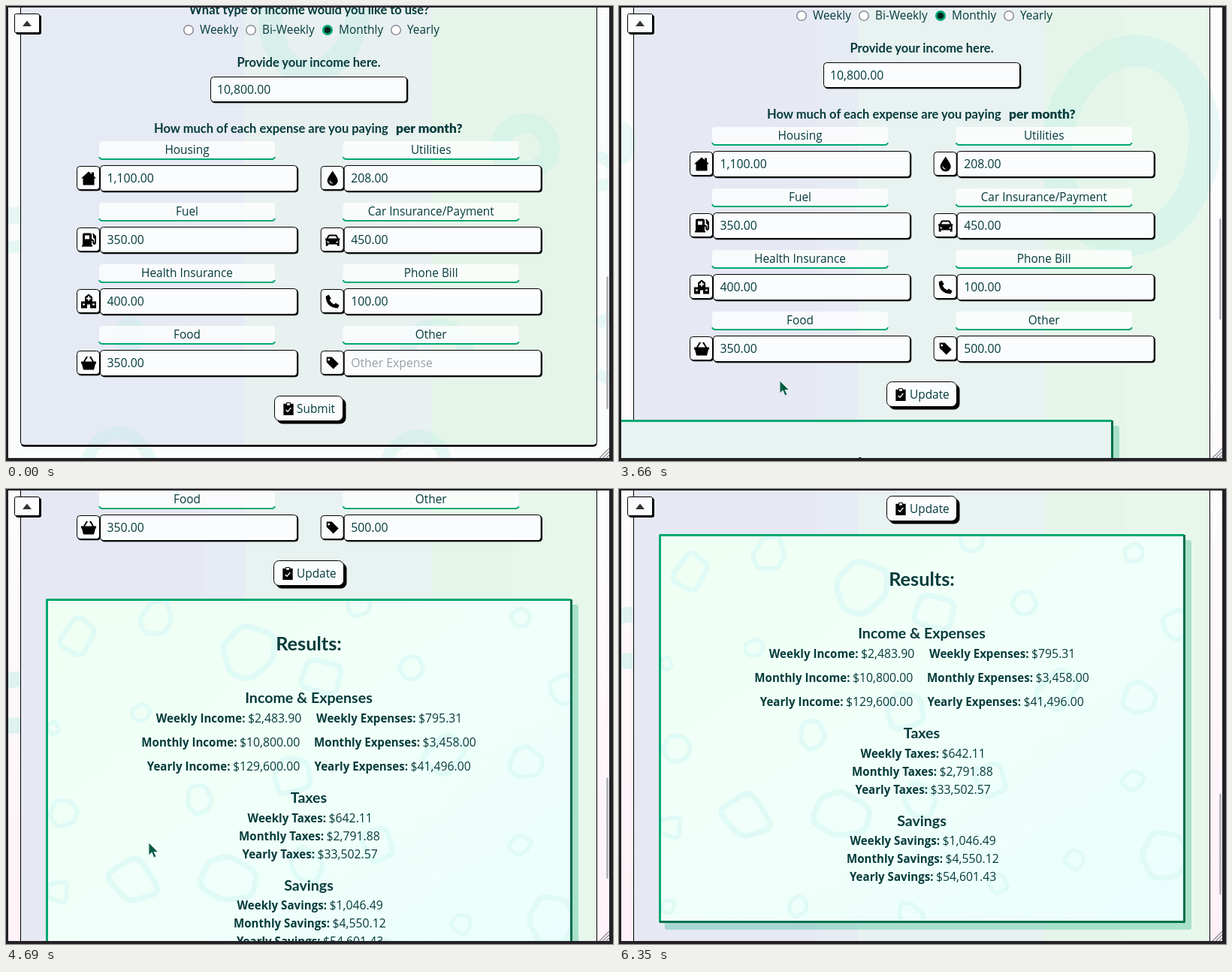
An HTML page that plays this animation: 808x606 px, repeating every 6500 ms.

```html
<!DOCTYPE html>
<html lang="en">
<head>
<meta charset="utf-8">
<title>Budget form</title>
<style>
  html, body { margin: 0; width: 100%; height: 100%; overflow: hidden; background: #232126; }
  svg { display: block; width: 808px; height: 606px; }
  text { font: 15.4px "Open Sans", "Noto Sans", sans-serif; fill: #053b3b; white-space: pre; }
  .num { font-size: 15.8px; }
  .mid { text-anchor: middle; }
  .end { text-anchor: end; font-weight: 700; font-size: 15.1px; }
  .head { font: 700 16.5px Lato, sans-serif; }
  .strong { font: 900 17.4px Lato, sans-serif; }
  .sub { font: 700 19.6px Lato, sans-serif; }
  .title { font: 700 25.3px Lato, sans-serif; }
  .hint { fill: #9aa0a8; }
  .item { font: 10.8px Roboto, sans-serif; fill: #fbfbfe; }
  .foot { fill: #cbdad6; }
</style>
</head>
<body>
<svg viewBox="0 0 808 606">
  <defs>
    <linearGradient id="mint" x2="1" y2="1">
      <stop stop-color="#f0fff3"/><stop offset=".5" stop-color="#f0fff9"/><stop offset="1" stop-color="#eafefe"/>
    </linearGradient>
    <linearGradient id="blush" gradientUnits="userSpaceOnUse" x1="0" y1="450" x2="0" y2="1100">
      <stop stop-color="#fdfdfd"/><stop offset="1" stop-color="#fff0f7"/>
    </linearGradient>
    <clipPath id="sheet"><rect x="55" y="572" width="696" height="514"/></clipPath>
  </defs>
  <g id="page">
    <g id="before"></g>
    <g id="after"></g>
    <g id="form"></g>
    <g id="lastRow"></g>
    <g id="button"></g>
    <g id="results"></g>
  </g>
  <g id="chrome"></g>
  <rect id="thumb" x="799" width="3" rx="1.5" fill="#b9b9bf"/>
  <path d="M0 0H808V606H0ZM3 2V602H803V2Z" fill="#232126" fill-rule="evenodd"/>
  <g id="cursor"></g>
</svg>
<script>
const LOOP = 6500, SUBMIT = 2950, GREEN = '#00a873';
const $ = id => document.getElementById(id);
const clamp = u => Math.max(0, Math.min(1, u));
const smooth = u => u * u * (3 - 2 * u);
const mix = (a, b, u) => a + (b - a) * u;

// Keys are [time, ...values]; values between keys are eased.
function track(keys, t) {
  const i = keys.findIndex(k => k[0] > t);
  if (i === 0) return keys[0].slice(1);
  if (i < 0) return keys[keys.length - 1].slice(1);
  const a = keys[i - 1], b = keys[i], u = smooth((t - a[0]) / (b[0] - a[0]));
  return a.slice(1).map((v, k) => mix(v, b[k + 1], u));
}

const text = (x, y, s, cls = '') => `<text x="${x}" y="${y}" class="${cls}">${s}</text>`;
const rect = (x, y, w, h, fill, more = '') =>
  `<rect x="${x}" y="${y}" width="${w}" height="${h}" fill="${fill}" ${more}/>`;
const box = (x, y, w, h, drop, r = 4) =>
  rect(x + drop, y + drop, w, h, '#000', `rx="${r}" stroke="#000"`) +
  rect(x, y, w, h, '#fafcfe', `rx="${r}" stroke="#000"`);
const ring = (x, y, rx, ry, width, turn = 0) =>
  `<ellipse cx="${x}" cy="${y}" rx="${rx}" ry="${ry}" transform="rotate(${turn} ${x} ${y})"
    fill="none" stroke="#b9ece2" stroke-width="${width}" opacity=".33"/>`;

// Vertical colour bands given as [left edge, colour], ending at `end`.
const bands = (list, end, y, h) => list.map(([x, c], i) =>
  rect(x, y, (list[i + 1] || [end])[0] - x, h, c)).join('');
const panelEdge = bottom =>
  `<path d="M19.5-900V${bottom - 5}q0 5 5 5H781.5q5 0 5-5V-900" fill="none" stroke="#000"/>
   <path d="M21 ${bottom - 1}q1 2 4 2H781q4 0 5-3" fill="none" stroke="#000" stroke-width="2"/>`;

$('before').innerHTML =
  rect(0, 0, 808, 606, '#fbfdfc') +
  bands([[20, '#e6eaf4'], [317, '#e8f0f0'], [567, '#e6f5ea']], 786, 0, 585) +
  ring(411, 5, 58, 84, 32, 10) + ring(691, 188, 33, 32, 26) +
  ring(165, 438, 11, 15, 19, 10) + ring(573, 455, 38, 27, 23) +
  ring(150, 640, 48, 72, 17, 0) + ring(545, 618, 40, 46, 17, 20) +
  `<g fill="none" stroke="#b9ece2" opacity=".33"><path d="M0 280L20 278" stroke-width="22"/>
   <path d="M0 322L20 320M787 200Q800 203 808 212M787 240L808 236M787 425Q800 412 808 418M787 490L808 500" stroke-width="16"/></g>` +
  panelEdge(585);

$('after').innerHTML =
  rect(0, 0, 808, 1400, 'url(#blush)') +
  ring(212, 1140, 30, 24, 17) + ring(685, 1128, 34, 24, 17) +
  bands([[20, '#e6e9f4'], [264, '#e7ebf3'], [318, '#e8f2f1'], [567, '#e6f5ea'], [675, '#e8f7ec']], 786, 0, 1138) +
  ring(681, 205, 98, 127, 42, 8) + ring(0, 201, 10, 16, 26) +
  `<path d="M0 679L19 677M0 739L19 739" stroke="#b9ece2" stroke-width="21" opacity=".45"/>` +
  panelEdge(1138) +
  bands([[0, '#30575c'], [50, '#32595b'], [470, '#33594f']], 808, 1155, 200) +
  rect(0, 1154, 808, 2, '#000') + text(403, 1238, '© OltaByx, 2023', 'mid foot');

const icons = {
  house: 'M-10 0L0-9L4-5.5V-8H7V-3L10 0H7.5V9H-7.5V0Z',
  drop: 'M0-10C4-4 7 0 7 3.5A7 6.5 0 0 1-7 3.5C-7 0-4-4 0-10ZM-4 3Q-4 7 0 7V6Q-3 6-3 3Z',
  pump: 'M-9 9V7H-8V-7Q-8-9-6-9H2Q4-9 4-7V-1Q8-1 7 4Q8 5 8-1L6-3V-7L5-8L6-9L10-5V4Q8 9 5 4Q6 1 4 1V7H5V9ZM-5-6V-1H1V-6Z',
  car: 'M-9 8V1L-10-2H-8L-6-6Q-5-7-4-7H4Q5-7 6-6L8-2H10L9 1V8H6V6H-6V8ZM-6-2H6L4-5H-4ZM-7 1V4H-4ZM7 1V4H4Z',
  clinic: 'M-10 9V0H-5V-6L0-10L5-6V0H10V9H2V4H-2V9ZM-1-7V-5H-3V-3H-1V-1H1V-3H3V-5H1V-7ZM-8 3V5H-5V3ZM5 3V5H8V3Z',
  phone: 'M-9-7L-5-9L-2-4L-4-2Q-2 2 2 4L4 2L9 5L7 9Q-9 8-9-7Z',
  basket: 'M-10-2H-7L-3-9L-1-8L-5-2H5L1-8L3-9L7-2H10V1H9L7 9H-7L-9 1H-10Z',
  tag: 'M-8-8H-1L8 1L1 8L-8-1ZM-5-6A1.5 1.5 0 1 0-4.9-6Z',
  board: 'M-7-7H-3V-9H3V-7H7V9H-7ZM-2-8V-5H2V-8ZM-4 2L-1 5L4-1L3-2L-1 3L-3 1Z'
};
const icon = (name, x, y, k = 1) =>
  `<path d="${icons[name]}" transform="translate(${x} ${y}) scale(${k})" fill-rule="evenodd"/>`;

const label = (mid, y, w, s) =>
  rect(mid - w / 2, y, w, 24, '#fff', 'rx="4" fill-opacity=".78"') +
  `<path d="M${mid - w / 2} ${y + 21}q1 3 4 3H${mid + w / 2 - 4}q3 0 4-3" fill="none" stroke="${GREEN}" stroke-width="2"/>` +
  text(mid, y + 17, s, 'mid');

// shift slides the field left; grow (0..1) gives it the focus look.
function field(col, row, pic, name, value, { shift = 0, grow = 0, cls = 'num' } = {}) {
  const x = 94.5 + col * 324.7, y = 180 + row * 82, left = x - shift;
  const mid = x + 146.5 - (col ? 0 : shift);
  const input = grow
    ? rect(x + mix(31, 35, grow), y + mix(32.5, 31.5, grow), mix(262, 271, grow), mix(34, 35, grow),
        '#fafcfe', `rx="4" stroke="${GREEN}" stroke-width="${mix(1, 3, grow)}"`)
    : box(left + 31, y + 32.5, 262, 34, 1.3);
  return label(mid, y, mix(234, 247, grow), name) +
    box(left, y + 33.5, 30, 31, 1.3) + icon(pic, left + 15.5, y + 49.5) + input +
    text((grow ? x + mix(0, 4.5, grow) : left) + 40, y + 55 + grow, value, cls);
}

const radios = [[243, 'Weekly'], [326, 'Bi-Weekly'], [428, 'Monthly'], [519, 'Yearly']];
$('form').innerHTML =
  text(403.5, 11, 'What type of income would you like to use?', 'head mid') +
  radios.map(([x, s], i) => (i === 2
    ? `<circle cx="${x}" cy="32" r="7" fill="${GREEN}"/><circle cx="${x}" cy="32" r="4.3" fill="#06241c"/>`
    : `<circle cx="${x}" cy="32" r="6.3" fill="#fff" stroke="#8f8f9d" stroke-width="1.6"/>`) +
    text(x + 15, 37, s)).join('') +
  text(403, 81, 'Provide your income here.', 'head mid') +
  box(272.5, 94.5, 261, 33, 1.3) + text(281, 117, '10,800.00', 'num') +
  text(197, 169, 'How much of each expense are you paying', 'head') +
  text(519, 169, 'per month?', 'strong') +
  field(0, 0, 'house', 'Housing', '1,100.00') + field(1, 0, 'drop', 'Utilities', '208.00') +
  field(0, 1, 'pump', 'Fuel', '350.00') + field(1, 1, 'car', 'Car Insurance/Payment', '450.00') +
  field(0, 2, 'clinic', 'Health Insurance', '400.00') + field(1, 2, 'phone', 'Phone Bill', '100.00');

// Result sheet with its pattern of uneven, round-cornered pebbles
let seed = 7;
const rnd = () => (seed = seed * 16807 % 2147483647) / 2147483647;
function pebble([x, y, r]) {
  const n = 4 + Math.floor(rnd() * 3), turn = rnd() * 6.28;
  const pts = Array.from({ length: n }, (_, i) => {
    const a = turn + (i + rnd() * .35) / n * 6.283, d = r * (.8 + rnd() * .4);
    return [x + d * Math.cos(a), y + d * Math.sin(a)];
  });
  const toward = (i, j) => pts[i].map((v, k) => mix(v, pts[j][k], .28).toFixed(1));
  return pts.map((p, i) =>
    `${i ? 'L' : 'M'}${toward(i, (i + n - 1) % n)}Q${p.map(v => v.toFixed(1))} ${toward(i, (i + 1) % n)}`).join('') + 'Z';
}
const pebbles = [
  [97, 620, 28], [201, 595, 24], [321, 643, 38], [470, 580, 17], [686, 595, 15], [540, 663, 17],
  [424, 678, 31], [180, 723, 12], [62, 743, 11], [742, 691, 18], [379, 805, 28], [585, 783, 30],
  [692, 788, 23], [258, 839, 19], [78, 855, 21], [496, 895, 26], [685, 897, 15], [168, 945, 35],
  [294, 943, 35], [68, 961, 19], [397, 926, 24], [728, 999, 32], [606, 1004, 13], [505, 1038, 15],
  [239, 1065, 14], [387, 1078, 18], [65, 1067, 12]];
const pair = (x, y, name, value) => text(x, y, name + ':', 'end') + text(x + 3.5, y, value, 'num');

$('results').innerHTML =
  `<path d="M753 578H759Q762 578 762 581V1094Q762 1097 759 1097H64Q61 1097 61 1094V1088H753Z" fill="${GREEN}" opacity=".27"/>` +
  rect(53, 570, 700, 518, '#e8f4f1', 'rx="3"') +
  `<g id="fill">${rect(53, 570, 700, 518, 'url(#mint)', 'rx="3"')}
   <g clip-path="url(#sheet)" fill="none" stroke="#e0faf6">
   ${pebbles.map(p => `<path d="${pebble(p)}" stroke-width="${4 + p[2] * .1}"/>`).join('')}</g></g>
   <path d="M54.5 1087V571.5H752" fill="none" stroke="${GREEN}" stroke-width="3" stroke-linejoin="round"/>
   <path d="M752.5 571V1086.5H54" fill="none" stroke="#00704c" stroke-width="3" stroke-linejoin="round"/>` +
  text(403, 639, 'Results:', 'title mid') +
  text(403, 709, 'Income &amp; Expenses', 'sub mid') +
  pair(318.5, 735, 'Weekly Income', '$2,483.90') + pair(545.5, 735, 'Weekly Expenses', '$795.31') +
  pair(307.5, 767, 'Monthly Income', '$10,800.00') + pair(551, 767, 'Monthly Expenses', '$3,458.00') +
  pair(298.5, 799, 'Yearly Income', '$129,600.00') + pair(535, 799, 'Yearly Expenses', '$41,496.00') +
  text(403, 842, 'Taxes', 'sub mid') +
  pair(426, 868, 'Weekly Taxes', '$642.11') + pair(423, 892, 'Monthly Taxes', '$2,791.88') +
  pair(411, 916, 'Yearly Taxes', '$33,502.57') +
  text(403, 959, 'Savings', 'sub mid') +
  pair(427, 984, 'Weekly Savings', '$1,046.49') + pair(431, 1008, 'Monthly Savings', '$4,550.12') +
  pair(418.5, 1032, 'Yearly Savings', '$54,601.43');

$('chrome').innerHTML = box(11.5, 10.5, 33, 25, 2, 2) +
  `<path d="M22 27L28 19.5L34 27Z" fill="#333"/>
   <path d="M790 602L803 589M794.5 602L803 593.5M799 602L803 598" stroke="#8c8c92" stroke-width="1.3"/>`;

const arrow = '<path d="M0 0V17L4 13L7 20L10 18.5L7 12.5H12.5Z" fill="#005c46" stroke="#dfeee9"/>';
const beamStroke = (color, width) =>
  `<path d="M-5-8H-2Q0-8 0-6Q0-8 2-8H5M0-6V7M-5 9H-2Q0 9 0 7Q0 9 2 9H5" fill="none" stroke="${color}" stroke-width="${width}"/>`;
const beam = beamStroke('#fff', 4) + beamStroke('#5f8379', 2);

const scrollKeys = [[3590, 0], [4130, 408], [4600, 408], [5250, 714], [5280, 714], [5613, 510]];
const mouseKeys = [[340, 610, 610], [700, 557, 481], [2560, 557, 481], [2900, 415, 535], [3060, 415, 535],
  [3600, 214, 500], [4190, 202, 483], [5050, 183, 464], [5460, 182, 464], [5930, 478, 460], [6350, 772, 608]];
const focusKeys = [[600, 0], [830, 1], [SUBMIT, 1], [SUBMIT + 220, 0]];
const typing = [[1220, '5'], [1470, '50'], [1740, '500'], [2010, '500.'], [2040, '500.0'], [2070, '500.00']];
const history = ['500.00', '500', '50.00', '550.00', '5.00'];

function lastRow(t) {
  const [grow] = track(focusKeys, t);
  const typed = typing.reduce((s, [at, v]) => t >= at ? v : s, '');
  let out = field(0, 3, 'basket', 'Food', '350.00', { shift: 8 * grow }) +
    field(1, 3, 'tag', 'Other', typed || 'Other Expense',
      { shift: 8 * grow, grow, cls: typed ? 'num' : 'num hint' });
  if (t > 700 && t < 2220) {
    const digits = typed.replace('.', '').length;
    out += rect(464 + digits * 9.05 + (typed.length - digits) * 4.2, 466, 1, 18, '#053b3b');
  }
  if (typed && t < SUBMIT) {
    const hits = history.filter(s => s.startsWith(typed));
    out += rect(455, 490, 268, 1.5 + hits.length * 20.4, '#2b2a33', 'stroke="#55545c" stroke-width=".5"') +
      hits.map((s, i) => text(461, 506 + i * 20.4, s, 'item')).join('');
  }
  return out;
}

function button(done) {
  const x = done ? 356.5 : 357.5;
  return box(x, 519.5, done ? 93 : 91, 33, 3.5, 7) + icon('board', x + 18.5, 536.5, .95) +
    text(387, 542, done ? 'Update' : 'Submit');
}

function draw(t) {
  const done = t >= SUBMIT, [mx, my] = track(mouseKeys, t);
  const scroll = Math.round(track(scrollKeys, t)[0]);
  $('page').setAttribute('transform', `translate(0 ${-scroll})`);
  $('before').style.display = done ? 'none' : '';
  $('after').style.display = $('results').style.display = done ? '' : 'none';
  $('lastRow').innerHTML = lastRow(t);
  $('button').innerHTML = button(done);

  const slide = 1 - clamp((t - 3100) / 900);
  $('results').setAttribute('transform', `translate(${Math.round(-680 * slide * slide)} 0)`);
  $('fill').setAttribute('opacity', clamp((t - 3640) / 300));

  $('thumb').setAttribute('y', done ? 278 + scroll / 4 : 360);
  $('thumb').setAttribute('height', done ? 135 : 177);

  $('cursor').style.display = t < 340 || t >= 6350 ? 'none' : '';
  $('cursor').innerHTML = t < 2900 && my < 495 ? beam : arrow;
  $('cursor').setAttribute('transform', `translate(${Math.round(mx)} ${Math.round(my)})`);
}

const start = performance.now();
(function tick() {
  draw((performance.now() - start) % LOOP);
  requestAnimationFrame(tick);
})();
</script>
</body>
</html>
```
